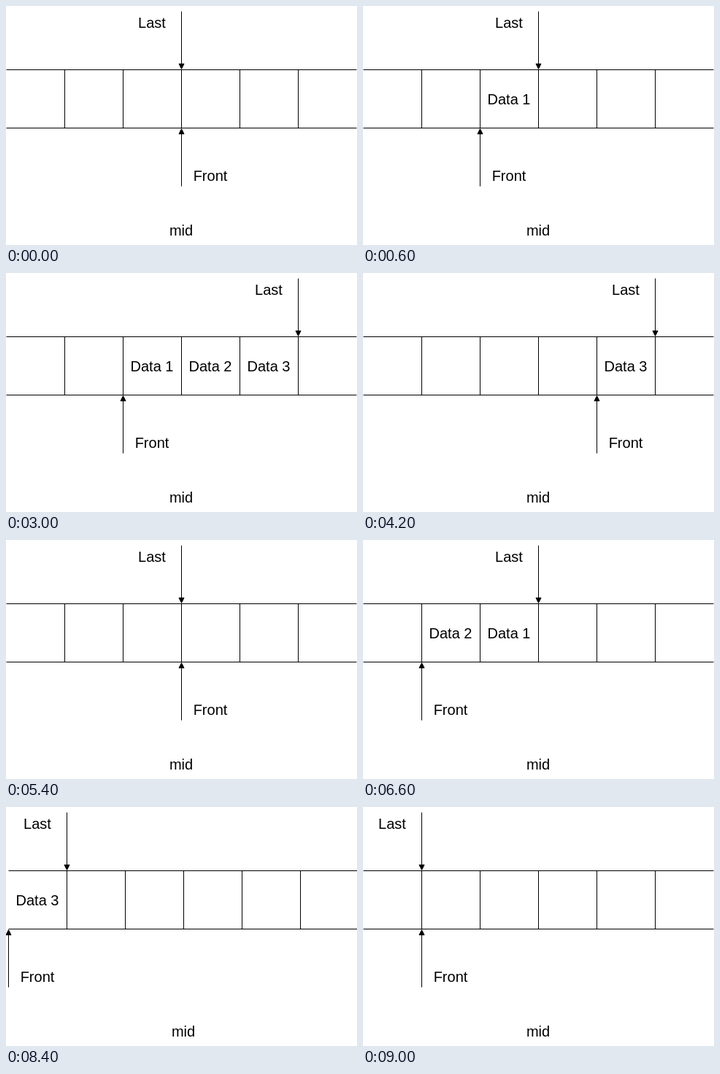
These frames come from a looping animation (481x328 px, 9600 ms). An HTML page:

```html
<!DOCTYPE html>
<html lang="en">
<head>
<meta charset="utf-8">
<title>Double-ended queue</title>
<style>
  html, body { margin: 0; width: 100%; height: 100%; overflow: hidden; background: #fff; }
  svg { display: block; }
  text { font: 20px Arial, "Liberation Sans", sans-serif; text-anchor: middle; }
  path { stroke: #000; stroke-miterlimit: 10; }
</style>
</head>
<body>
<svg width="481" height="328" viewBox="0 0 481 328">
  <g id="scene">
    <path d="M.5 87.5h480M.5 167.5h480M80.5 87.5v80m80-80v80m80-80v80m80-80v80m80-80v80"/>
    <g id="cells"></g>
    <g id="last">
      <path d="M.5 7.5V80M.5 86.4l-3.5-7h7z"/>
      <text x="-40" y="30">Last</text>
    </g>
    <g id="front">
      <path d="M.5 247.5V175M.5 168.6l-3.5 7h7z"/>
      <text x="40" y="240">Front</text>
    </g>
    <text x="240" y="315">mid</text>
  </g>
</svg>
<script>
const STEP = 600, CELL = 80;

// [front, last, data number in each cell, horizontal shift]
const steps = [
  [3, 3, ''],
  [2, 3, '  1'],
  [2, 4, '  12'],
  [2, 5, '  123'],
  [1, 5, ' 4123'],
  [2, 5, '  123'],
  [3, 5, '   23'],
  [4, 5, '    3'],
  [5, 5, ''],
  [3, 3, ''],
  [2, 3, '  1'],
  [1, 3, ' 21'],
  [0, 3, '321', 3],
  [0, 2, '32', 3],
  [0, 1, '3', 3],
  [1, 1, '']
];

const byId = id => document.getElementById(id);
const moveTo = (id, x) => byId(id).setAttribute('transform', `translate(${x})`);
let shown = -1;

function show([front, last, data, shift = 0]) {
  moveTo('scene', shift);
  moveTo('front', front * CELL);
  moveTo('last', last * CELL);
  byId('cells').innerHTML = [...data].map((n, i) =>
    n === ' ' ? '' : `<text x="${(i + 0.5) * CELL}" y="135">Data ${n}</text>`).join('');
}

function tick() {
  const step = Math.floor(performance.now() / STEP) % steps.length;
  if (step !== shown) show(steps[shown = step]);
  requestAnimationFrame(tick);
}
tick();
</script>
</body>
</html>
```
